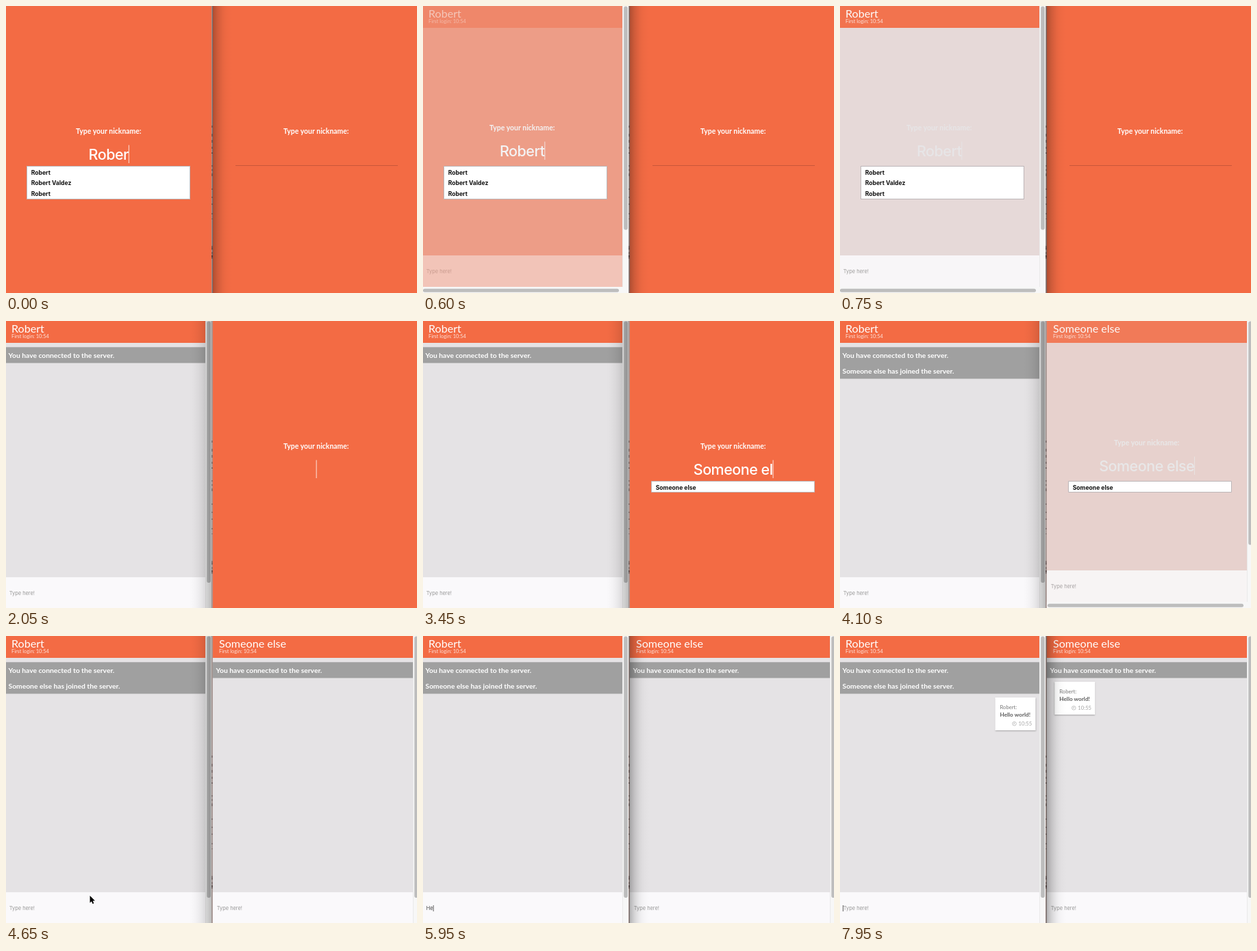
An HTML page with a canvas that plays this animation: 600 px wide and 420 px high, repeating every 8 s.

```html
<!DOCTYPE html>
<html lang="en">
<head>
<meta charset="utf-8">
<title>Chat demo</title>
<style>
html, body { margin: 0; width: 100%; height: 100%; overflow: hidden; background: #f36b44; }
canvas { display: block; width: 600px; height: 420px; }
</style>
</head>
<body>
<canvas id="stage"></canvas>
<script>
const W = 600, H = 420, LOOP = 8000;
const ORANGE = '#f36b44', PAGE = '#e5e3e5', PAPER = '#faf9fb';
const LATO = 'Lato, sans-serif', SANS = 'Inter, sans-serif';
const FIRST = 'Robert', SECOND = 'Someone else', HELLO = 'Hello world!';
const FADE = 400;
const RIGHT_X = 303;

// Moments of the story, in ms
const T = {
  leftEnter: 421, rightFocus: 1500, rightType: 2100, rightEnter: 3800,
  leftFocus: 4900, helloType: 5750, send: 7740
};

const canvas = document.getElementById('stage');
const ctx = canvas.getContext('2d');
const layer = document.createElement('canvas');
const layerCtx = layer.getContext('2d');
const dpr = window.devicePixelRatio || 1;
for (const c of [canvas, layer]) {
  c.width = W * dpr;
  c.height = H * dpr;
}

function box(g, x, y, w, h, color) {
  g.fillStyle = color;
  g.fillRect(x, y, w, h);
}

function pill(g, x, y, w, h, color) {
  g.fillStyle = color;
  g.beginPath();
  g.roundRect(x, y, w, h, Math.min(w, h) / 2);
  g.fill();
}

// Draws text and returns its width
function label(g, str, x, y, font, color) {
  g.font = font;
  g.fillStyle = color;
  g.fillText(str, x, y);
  return g.measureText(str).width;
}

function typed(str, t, start, step) {
  return t < start ? '' : str.slice(0, Math.floor((t - start) / step) + 1);
}

function fadeOut(t, start) {
  const p = Math.min(1, Math.max(0, (t - start) / FADE));
  return (1 + Math.cos(Math.PI * p)) / 2;
}

function drawLogin(g, s) {
  const d = s.shrunk ? 5 : 0;
  const mid = 149.7 - d;
  box(g, -2, 0, s.shrunk ? 293 : 310, s.shrunk ? 411 : H, ORANGE);

  g.textAlign = 'center';
  label(g, 'Type your nickname:', mid, 187 - d, '700 10.4px ' + LATO, '#fff');
  g.letterSpacing = '-0.5px';
  const w = label(g, s.typed, mid, 225 - d, '500 21.5px ' + SANS, '#fff');
  g.letterSpacing = '0px';
  g.textAlign = 'left';

  if (s.focus) box(g, mid + w / 2, 203.5 - d, 0.8, 26.5, '#fff');
  else box(g, 32, 233, 237, 1, '#c9573a');
}

function drawMenu(g, items) {
  const h = items.length * 16;
  box(g, 30.5, 234.5, 238, h, '#fff');
  g.strokeStyle = '#bdb6b8';
  g.lineWidth = 1;
  g.strokeRect(30.5, 234.5, 238, h);
  items.forEach((item, i) =>
    label(g, item, 36.7, 246.6 + i * 15.7, '700 8.6px ' + SANS, '#111'));
}

function drawCard(g, x, y) {
  g.save();
  g.shadowColor = 'rgba(0,0,0,.28)';
  g.shadowBlur = 2 * dpr;
  g.shadowOffsetY = dpr;
  box(g, x, y, 59, 48, '#fff');
  g.restore();
  label(g, FIRST + ':', x + 7, y + 17, '400 7.7px ' + LATO, '#777');
  label(g, HELLO, x + 7, y + 27.5, '700 8.2px ' + LATO, '#5c5c5c');
  label(g, '10:55', x + 34, y + 41, '400 7.7px ' + LATO, '#a5a5a5');
  g.strokeStyle = '#b2b2b2';
  g.lineWidth = 0.8;
  g.beginPath();
  g.arc(x + 28, y + 38.3, 2.8, 0, Math.PI * 2);
  g.moveTo(x + 28, y + 36.6);
  g.lineTo(x + 28, y + 38.5);
  g.lineTo(x + 26.8, y + 38.5);
  g.stroke();
}

function drawChat(g, s) {
  box(g, -2, 0, 310, H, PAGE);
  if (s.notes.length) box(g, -2, 38.3, 293, 23 * s.notes.length + 0.2, '#a0a0a0');
  s.notes.forEach((note, i) =>
    label(g, note, 3.5, 54 + i * 23, '700 10.3px ' + LATO, '#fff'));
  if (s.card) drawCard(g, ...s.card);
}

// Header and message field
function drawBars(g, s) {
  const foot = s.shrunk ? 365 : 375;
  box(g, -2, 0, 293, 32, ORANGE);
  label(g, s.name, 8, 17, '400 16.1px ' + LATO, '#fff');
  label(g, 'First login: 10:54', 8, 25.3, '400 7.4px ' + LATO, '#fde3db');

  box(g, -2, foot, 293, (s.shrunk ? 411 : H) - foot, PAPER);
  if (s.draft) {
    const w = label(g, s.draft, 4.8, foot + 26.4, '400 7.4px ' + SANS, '#444');
    box(g, 5 + w, foot + 19, 0.7, 9, '#222');
  } else {
    label(g, 'Type here!', 4.8, foot + 26.4, '400 7.4px ' + SANS, '#999');
    if (s.caret) box(g, 4.2, foot + 19, 0.7, 9, '#222');
  }
}

function drawScrollbars(g, s) {
  box(g, 291, 0, 10, H, '#f7f7f7');
  box(g, 291, 0, 0.7, H, '#e4e4e4');
  pill(g, 293.2, 0.5, 5.6, s.shrunk ? 327 : 382.5, '#bdbdbd');
  if (s.shrunk) {
    box(g, -2, 411, 310, 9, '#f7f7f7');
    pill(g, 0, 413.8, 286, 5, '#bdbdbd');
  }
}

function drawPane(x, s) {
  const edge = x ? 301.5 : 0;
  const place = g => {
    g.setTransform(dpr, 0, 0, dpr, 0, 0);
    g.beginPath();
    g.rect(edge, 0, x ? W - edge : 300, H);
    g.clip();
    g.translate(x, 0);
  };
  // Draws a part as one group with the given opacity
  const fade = (part, alpha) => {
    if (alpha <= 0) return;
    layerCtx.save();
    layerCtx.setTransform(1, 0, 0, 1, 0, 0);
    layerCtx.clearRect(0, 0, layer.width, layer.height);
    place(layerCtx);
    part(layerCtx, s);
    layerCtx.restore();
    ctx.globalAlpha = alpha;
    ctx.drawImage(layer, -x, 0, W, H);
    ctx.globalAlpha = 1;
  };

  ctx.save();
  place(ctx);
  drawChat(ctx, s);
  fade(drawLogin, s.alpha);
  fade(drawBars, 1 - s.alpha);
  if (s.shrunk || s.alpha === 0) drawScrollbars(ctx, s);
  if (s.menu && s.alpha > 0) drawMenu(ctx, s.menu);
  ctx.restore();
}

// Shadow of the focused window on the other one
function drawShadow(from, to, strength) {
  const grad = ctx.createLinearGradient(from, 0, to, 0);
  for (let i = 0; i <= 8; i++) {
    const p = i / 8;
    grad.addColorStop(p, `rgba(0,0,0,${strength * (1 - p) ** 2.4})`);
  }
  box(ctx, Math.min(from, to), 0, Math.abs(to - from), H, grad);
}

function drawGap() {
  box(ctx, 300, 0, 1.6, H, '#a08f8b');
  let seed = 7;
  for (let i = 0; i < 26; i++) {
    seed = (seed * 16807) % 2147483647;
    box(ctx, 300.3, 170 + seed % 230, 1, 1 + seed % 3, 'rgba(50,35,35,.6)');
  }
}

function drawPointer(x, y) {
  const pts = [[0, 0], [0, 10.5], [2.4, 8.3], [4, 12], [5.8, 11.2], [4.2, 7.6], [7.4, 7.4]];
  ctx.beginPath();
  pts.forEach(([px, py]) => ctx.lineTo(x + px, y + py));
  ctx.closePath();
  ctx.lineJoin = 'round';
  ctx.strokeStyle = '#fff';
  ctx.lineWidth = 1.6;
  ctx.stroke();
  ctx.fillStyle = '#000';
  ctx.fill();
}

function movePointer(t, start, end, hide, a, b) {
  if (t < start || t >= hide) return;
  const p = Math.min(1, (t - start) / (end - start));
  const e = p * p * (3 - 2 * p);
  drawPointer(a[0] + (b[0] - a[0]) * e, a[1] + (b[1] - a[1]) * e);
}

function draw(t) {
  ctx.setTransform(dpr, 0, 0, dpr, 0, 0);
  const rightActive = t >= T.rightFocus && t < T.leftFocus;
  const leftAlpha = fadeOut(t, T.leftEnter);
  const rightAlpha = fadeOut(t, T.rightEnter);
  const sent = t >= T.send;
  const connected = 'You have connected to the server.';

  const leftNotes = leftAlpha > 0 ? [] : [connected];
  if (t >= T.rightEnter) leftNotes.push(SECOND + ' has joined the server.');

  drawPane(0, {
    name: FIRST,
    alpha: leftAlpha,
    shrunk: t >= T.leftEnter && leftAlpha > 0,
    typed: t < 150 ? FIRST.slice(0, 5) : FIRST,
    focus: true,
    menu: [FIRST, FIRST + ' Valdez', FIRST],
    notes: leftNotes,
    draft: sent ? '' : typed(HELLO, t, T.helloType, 155),
    caret: t >= T.leftFocus,
    card: sent && [226.5, 90]
  });

  drawPane(RIGHT_X, {
    name: SECOND,
    alpha: rightAlpha,
    shrunk: t >= T.rightEnter && rightAlpha > 0,
    typed: typed(SECOND, t, T.rightType, 145),
    focus: t >= T.rightFocus,
    menu: t >= T.rightType && [SECOND],
    notes: rightAlpha > 0 ? [] : [connected],
    card: sent && [10.3, 67]
  });

  drawGap();
  if (rightActive) drawShadow(300, 262, 0.24);
  else drawShadow(301, 332, 0.3);

  movePointer(t, 1100, 1450, 1600, [150, 300], [411, 214]);
  movePointer(t, 4300, 4600, 4850, [411, 214], [122.5, 380]);
}

const begin = performance.now();
function tick() {
  draw((performance.now() - begin) % LOOP);
  requestAnimationFrame(tick);
}
tick();
</script>
</body>
</html>
```
